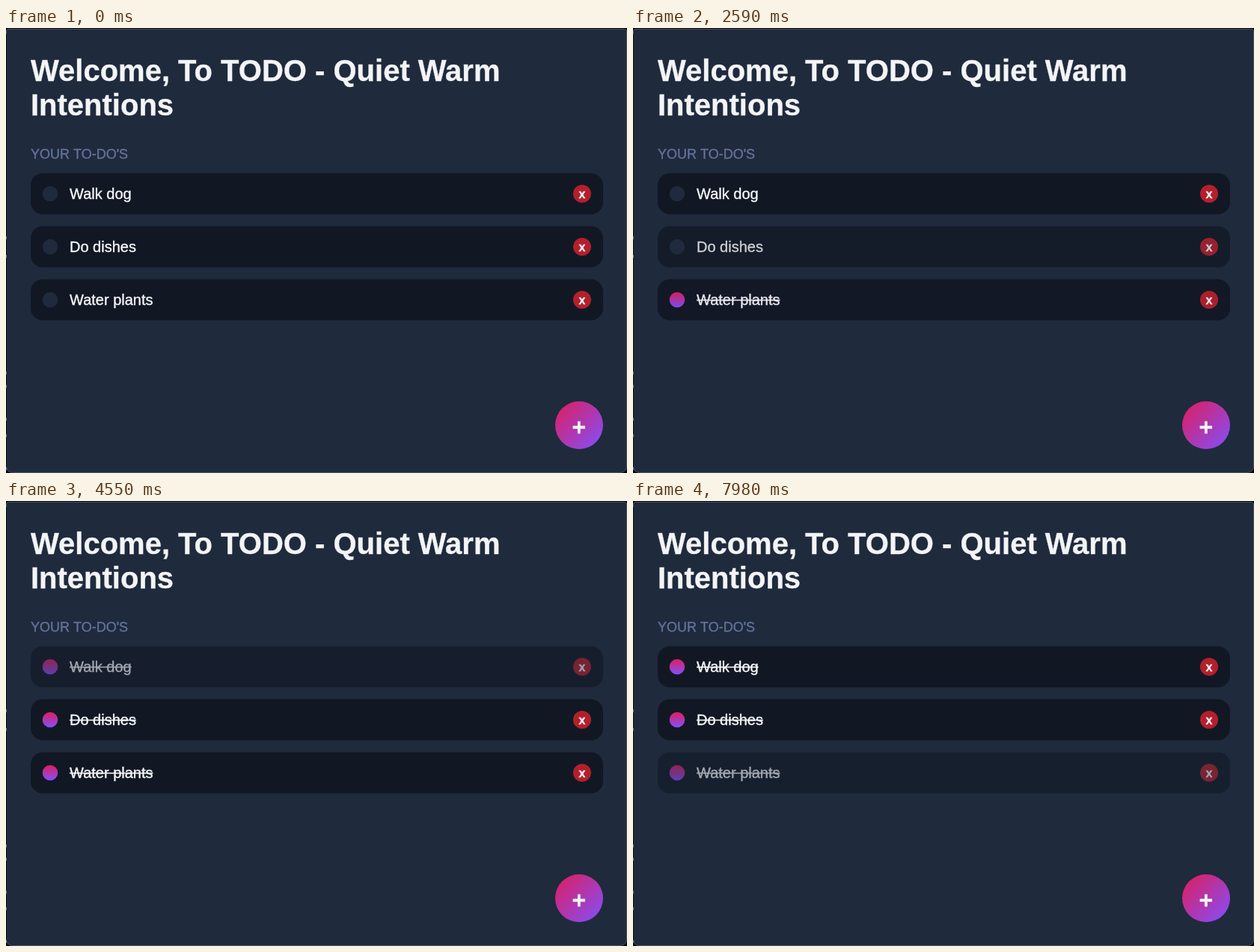
Write an HTML page with a canvas that moves like this. It is 830 by 596 pixels and loops after 8000 ms.

```html
<!DOCTYPE html>
<html lang="en">
<head>
<meta charset="utf-8">
<title>To-do list</title>
<style>
  html, body { margin: 0; width: 100%; height: 100%; overflow: hidden; background: #05070b; }
  canvas { display: block; }
</style>
</head>
<body>
<canvas id="stage" width="830" height="596"></canvas>
<script>
const ctx = document.getElementById('stage').getContext('2d');
const LOOP = 8000;
const FADE = 700;
const DIM = 0.6;
const FONT = '"Liberation Sans", Arial, sans-serif';
const BG = '#1f2a3d';

// hover: alternating times at which the pointer enters and leaves the row
const items = [
  { label: 'Walk dog', checked: 4550, hover: [3600, 5380] },
  { label: 'Do dishes', checked: 3220, hover: [2390, 3520, 5500, 5680] },
  { label: 'Water plants', checked: 1960, hover: [1120, 2220, 5620, 5780, 7420] }
];

// Cubic Bezier (0.25, 0.1, 0.25, 1), solved for x by bisection
function ease(x) {
  if (x <= 0) return 0;
  if (x >= 1) return 1;
  const curve = (u, a, b) => 3 * u * (1 - u) * (1 - u) * a + 3 * u * u * (1 - u) * b + u * u * u;
  let lo = 0, hi = 1;
  for (let i = 0; i < 24; i++) {
    const mid = (lo + hi) / 2;
    if (curve(mid, 0.25, 0.25) < x) lo = mid; else hi = mid;
  }
  return curve(lo, 0.1, 1);
}

// How far a row is dimmed (0..1); a reversed fade takes proportionally less time
function dimming(hover, time) {
  let from = 0, to = 0, start = 0;
  const at = t => {
    const span = FADE * Math.abs(to - from);
    return span ? from + (to - from) * ease((t - start) / span) : to;
  };
  hover.forEach((moment, i) => {
    if (time < moment) return;
    from = at(moment);
    to = i % 2 ? 0 : 1;
    start = moment;
  });
  return at(time);
}

// A hairline outline gives the slightly heavier strokes of smoothed type
function text(str, x, y, size, color, weight = 'normal') {
  ctx.font = `${weight} ${size}px ${FONT}`;
  ctx.fillStyle = ctx.strokeStyle = color;
  ctx.lineWidth = 0.35;
  ctx.fillText(str, x, y);
  ctx.strokeText(str, x, y);
  return ctx.measureText(str).width;
}

// Centres the visible glyph on the given point
function glyph(str, x, y, size) {
  ctx.font = `bold ${size}px ${FONT}`;
  const m = ctx.measureText(str);
  const dx = (m.actualBoundingBoxLeft - m.actualBoundingBoxRight) / 2;
  const dy = (m.actualBoundingBoxAscent - m.actualBoundingBoxDescent) / 2;
  text(str, x + dx, y + dy, size, '#f4f4f6', 'bold');
}

function disc(x, y, r, fill) {
  ctx.fillStyle = fill;
  ctx.beginPath();
  ctx.arc(x, y, r, 0, Math.PI * 2);
  ctx.fill();
}

function box(x, y, w, h, r, fill) {
  ctx.fillStyle = fill;
  ctx.beginPath();
  ctx.roundRect(x, y, w, h, r);
  ctx.fill();
}

function gradient(x0, y0, x1, y1) {
  const g = ctx.createLinearGradient(x0, y0, x1, y1);
  g.addColorStop(0, '#e11d5a');
  g.addColorStop(1, '#8050ff');
  return g;
}

function drawWindow() {
  ctx.fillStyle = '#05070b';
  ctx.fillRect(0, 0, 830, 596);
  box(0.5, 1.5, 829, 594, [3, 3, 8, 8], BG);
  ctx.strokeStyle = '#4a5361';
  ctx.lineWidth = 1;
  ctx.stroke();
  ctx.fillStyle = '#0b1019';
  ctx.fillRect(0, 8, 1, 580);
  ctx.fillStyle = '#6b7280';
  for (const y of [279, 304, 460, 478, 522, 544, 588]) ctx.fillRect(0, y, 1, 4);
}

function drawItem(item, index, time) {
  const top = 194.5 + index * 71;
  const mid = top + 27.5;
  const done = time >= item.checked;

  box(33, top, 765, 55, 16, '#111824');
  disc(59, mid, 10.3, done ? gradient(59, mid - 11, 59, mid + 11) : BG);
  const width = text(item.label, 85, mid + 7, 20, '#f8f9fb');
  if (done) ctx.fillRect(85, mid - 0.3, width, 1.6);
  disc(770, mid, 12, '#b3202c');
  glyph('x', 770, mid + 1.8, 16);

  // On a flat backdrop, a veil in its colour equals group opacity
  const veil = (1 - DIM) * dimming(item.hover, time);
  if (veil > 0) {
    ctx.globalAlpha = veil;
    box(32, top - 1, 767, 57, 16, BG);
    ctx.globalAlpha = 1;
  }
}

function draw(time) {
  drawWindow();
  text('Welcome, To TODO - Quiet Warm', 33, 71, 40, '#f3f4f6', 'bold');
  text('Intentions', 33, 117, 40, '#f3f4f6', 'bold');
  text("YOUR TO-DO'S", 33, 174.5, 18, '#64739a');
  items.forEach((item, i) => drawItem(item, i, time));
  disc(766, 532, 32, gradient(734, 500, 798, 564));
  glyph('+', 766, 534, 32);
}

const begin = performance.now();
function tick() {
  draw((performance.now() - begin) % LOOP);
  requestAnimationFrame(tick);
}
tick();
</script>
</body>
</html>
```
